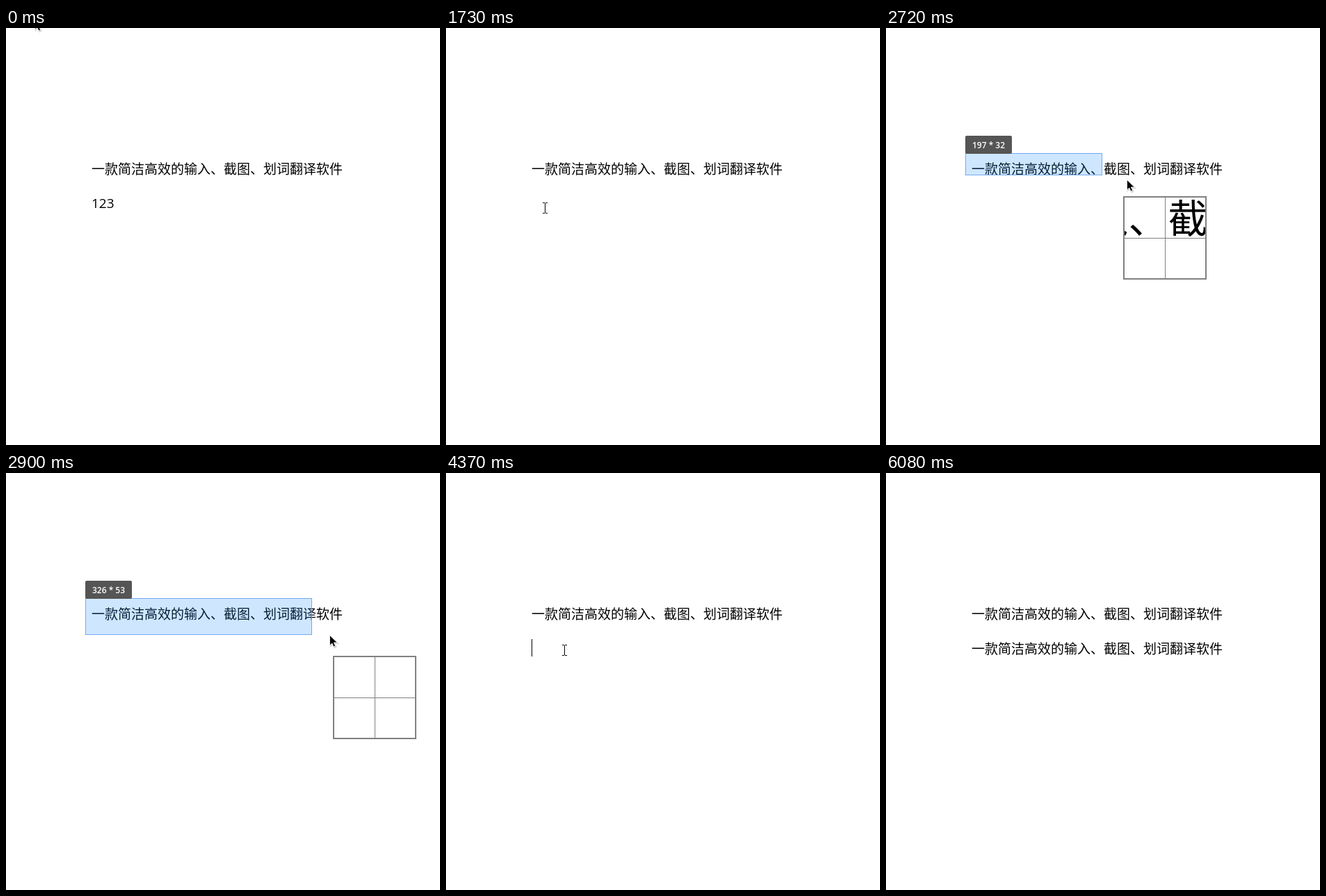
Recreate the animation shown at these times as an HTML page. Size 624 by 600 pixels, loop 6170 ms.

```html
<!DOCTYPE html>
<html lang="zh-CN">
<head>
<meta charset="utf-8">
<title>截图翻译</title>
<style>
html, body { margin: 0; width: 100%; height: 100%; overflow: hidden; background: #fff; }
svg { display: block; }
text { font: 350 19px "Noto Sans CJK SC", sans-serif; white-space: pre; }
#digits, #size { font-family: "Open Sans", sans-serif; font-weight: 500; }
#size { font-size: 12px; font-weight: 600; fill: #fff; }
.px { shape-rendering: crispEdges; }
</style>
</head>
<body>
<svg width="624" height="600" viewBox="0 0 624 600">
  <text class="line" x="123" y="210"></text>
  <text id="copy" class="line" x="123" y="260"></text>
  <rect id="mark" class="px" x="123" y="239" width="34" height="25" fill="#0078d7"/>
  <text id="digits" x="123" y="259">123</text>
  <rect id="caret" class="px" y="239" width="1" height="25"/>

  <g id="area">
    <rect id="zone" class="px" x="114.5" y="180.5" fill="rgba(24,144,255,.21)" stroke="#70aaf2"/>
    <rect id="tag" x="114" y="155" height="26" rx="2" fill="#555"/>
    <text id="size" x="124" y="173"></text>
  </g>

  <g id="lens" class="px">
    <rect x="1" y="1" width="118" height="118" fill="#fff" stroke="#808080" stroke-width="2"/>
    <svg id="view" x="2" y="2" width="116" height="116">
      <text class="line" x="123" y="210"></text>
    </svg>
    <path d="M60.5 2V118M2 60.5H118" stroke="#808080"/>
  </g>

  <g id="dots" fill="#999">
    <circle cx="504.5" cy="256.5"/>
    <circle cx="516.5" cy="256.5"/>
    <circle cx="528.5" cy="256.5"/>
  </g>

  <g id="arrow">
    <path d="M1.5 2v14l3.2-2.8 2.4 5 2.4-1-2.3-5h4.8z" opacity=".14" stroke="#000" stroke-width="2"/>
    <path d="M.5 .5v14.5l3.3-3 2.3 5 2.5-1.1-2.2-4.9h4.9z" stroke="#fff" stroke-width=".8"/>
  </g>
  <path id="beam" class="px" d="M-3-7.5H0M1-7.5H4M.5-7V7M-3 7.5H0M1 7.5H4" stroke="#000" fill="none"/>
</svg>
<script>
const LOOP = 6170, STEP = 90, BLINK = 530, LAG = 32, ZOOM = 3;
const TEXT = '一款简洁高效的输入、截图、划词翻译软件';
// events on the timeline, in ms
const SELECT = 830, ERASE = 1190, CAPTURE = 2090, DRAG = 2540, RELEASE = 3350,
      FOCUS = 4370, PASTE = 4650, LEAVE = 6080;

// stops of the pointer: [time, x, y]
const stops = [
  [0, 41, -13], [650, 141, 257], [1820, 142, 259], [2058, 128, 205],
  [2238, 121, 190], [2450, 114, 180], [2868, 440, 233], [2900, 465, 233],
  [3048, 501, 233], [3440, 500, 234], [4010, 170, 255], [5270, 170, 255], [LEAVE, 44, -30]
];

const $ = id => document.getElementById(id);
const show = (id, on) => { $(id).style.display = on ? '' : 'none'; };
const set = (el, attrs) => { for (const k in attrs) el.setAttribute(k, attrs[k]); };
const move = (id, x, y) => set($(id), { transform: `translate(${x} ${y})` });
const ease = k => k * k * (3 - 2 * k);

// the screen refreshes in steps, with two slightly longer ones
function tick(t) {
  const base = t < 560 ? 0 : t < 3920 ? 560 : 3920;
  return base + Math.floor((t - base) / STEP) * STEP;
}

function pointer(t) {
  const i = stops.findIndex(s => s[0] > t);
  const [t1, x1, y1] = stops[i < 0 ? stops.length - 1 : i];
  if (i < 0) return [x1, y1];
  const [t0, x0, y0] = stops[i - 1];
  const k = ease((t - t0) / (t1 - t0));
  return [Math.round(x0 + (x1 - x0) * k), Math.round(y0 + (y1 - y0) * k)];
}

function drawCaret(t, selected) {
  const reset = [PASTE, FOCUS, ERASE, SELECT].find(s => t >= s);
  const active = t < CAPTURE || t >= FOCUS && t < LEAVE;
  show('caret', reset && active && (t - reset) % (2 * BLINK) < BLINK);
  set($('caret'), {
    x: selected ? 156 : t < PASTE ? 123 : 484,
    fill: selected ? '#ff8728' : '#000'
  });
}

// the capture tool trails the pointer a little
function drawCapture(t) {
  const [x, y] = pointer(t - LAG), span = 116 / ZOOM, w = x - 114, h = y - 180;
  move('lens', x + 30, y + 30);
  set($('view'), { viewBox: `${x + .5 - span / 2} ${y + .5 - span / 2} ${span} ${span}` });
  show('area', t >= DRAG);
  if (t < DRAG) return;
  set($('zone'), { width: Math.max(0, w - 1), height: Math.max(0, h - 1) });
  $('size').textContent = `${w} * ${h}`;
  set($('tag'), { width: Math.round($('size').getComputedTextLength()) + 20 });
}

function draw(time) {
  const t = tick(time), within = (a, b) => t >= a && t < b;
  const selected = within(SELECT, ERASE), capture = within(CAPTURE, RELEASE);

  show('digits', t < ERASE);
  set($('digits'), { fill: selected ? '#fff' : '#000' });
  show('mark', selected);
  show('copy', t >= PASTE);
  drawCaret(t, selected);

  show('lens', capture);
  show('area', false);
  if (capture) drawCapture(t);

  show('dots', within(RELEASE, RELEASE + 4 * STEP));
  [...$('dots').children].forEach((dot, i) => {
    const phase = (t - RELEASE) / 900 - i * .175;
    set(dot, { r: 2 + 2 * Math.cos(phase * 2 * Math.PI) });
  });

  const arrow = t < STEP || capture;
  show('arrow', arrow);
  show('beam', !arrow);
  move(arrow ? 'arrow' : 'beam', ...pointer(t));
}

document.querySelectorAll('.line').forEach(el => { el.textContent = TEXT; });
const begin = performance.now();
function frame() {
  draw((performance.now() - begin) % LOOP);
  requestAnimationFrame(frame);
}
frame();
</script>
</body>
</html>
```
